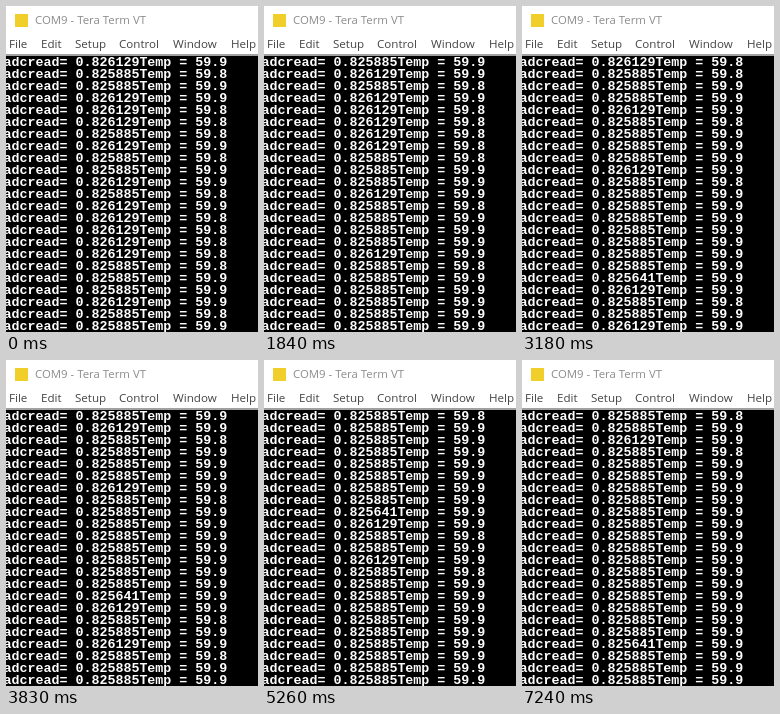
These frames come from a looping animation (252 px wide and 326 px high, 7460 ms). An HTML page:

```html
<!DOCTYPE html>
<html lang="en">
<head>
<meta charset="utf-8">
<title>Serial terminal</title>
<style>
  html, body { margin: 0; width: 100%; height: 100%; overflow: hidden; background: #fff; }
  svg { display: block; width: 252px; height: 326px; }
  .title { font: 11.4px "Open Sans", "Noto Sans", sans-serif; fill: #8c8c8c; }
  .menu { font: 11.6px "Open Sans", "Noto Sans", sans-serif; fill: #444; }
  .log { font: bold 13.333px "Liberation Mono", monospace; fill: #fff; }
</style>
</head>
<body>
<svg viewBox="0 0 252 326">
  <rect width="252" height="326" fill="#fff"/>
  <rect x="9" y="8" width="13" height="13" fill="#f0cf2a"/>
  <text class="title" x="29" y="18">COM9 - Tera Term VT</text>
  <g class="menu">
    <text x="3" y="42">File</text>
    <text x="35" y="42">Edit</text>
    <text x="69" y="42">Setup</text>
    <text x="113" y="42">Control</text>
    <text x="167" y="42">Window</text>
    <text x="225" y="42">Help</text>
  </g>
  <rect y="48" width="252" height="2" fill="#a0a0a0"/>
  <rect y="50" width="252" height="276" fill="#000"/>
  <g class="log" id="log"></g>
</svg>
<script>
  const LOOP = 7460, ROWS = 23, PITCH = 12;
  const BURST = 1210, BURST_LINES = 6, FIRST = 200;

  // Sensor level per reading: + one step up, v one step down, otherwise steady
  const levels = "+--+++-+--+-+++++---+----+" + "-".repeat(8) + "v+--+" + "-".repeat(16) + "v";
  const volts = { "+": "0.826129", v: "0.825641" };

  // The temperature lags one reading behind
  const line = i =>
    `adcread= ${volts[levels[i]] || "0.825885"}Temp = ${levels[i - 1] === "+" ? "59.8" : "59.9"}`;

  // Lines arrive in bursts of six; the third one stays only half as long
  function scrolled(t) {
    const burst = Math.floor((t - FIRST) / BURST);
    const r = t - FIRST - burst * BURST;
    const k = r < 550 ? Math.min(2, Math.floor(r / 215)) : 3 + Math.floor((r - 550) / 220);
    return burst * BURST_LINES + k + 1;
  }

  const log = document.getElementById("log");
  const rows = Array.from({ length: ROWS }, (_, r) => {
    const row = document.createElementNS("http://www.w3.org/2000/svg", "text");
    row.setAttribute("x", -2.6);
    row.setAttribute("y", 60 + r * PITCH);
    return log.appendChild(row);
  });

  let shown = -1;
  function draw(t) {
    const top = scrolled(t);
    if (top === shown) return;
    rows.forEach((row, r) => { row.textContent = line(top + r); });
    shown = top;
  }

  const start = performance.now();
  function tick() {
    draw((performance.now() - start) % LOOP);
    requestAnimationFrame(tick);
  }
  tick();
</script>
</body>
</html>
```
